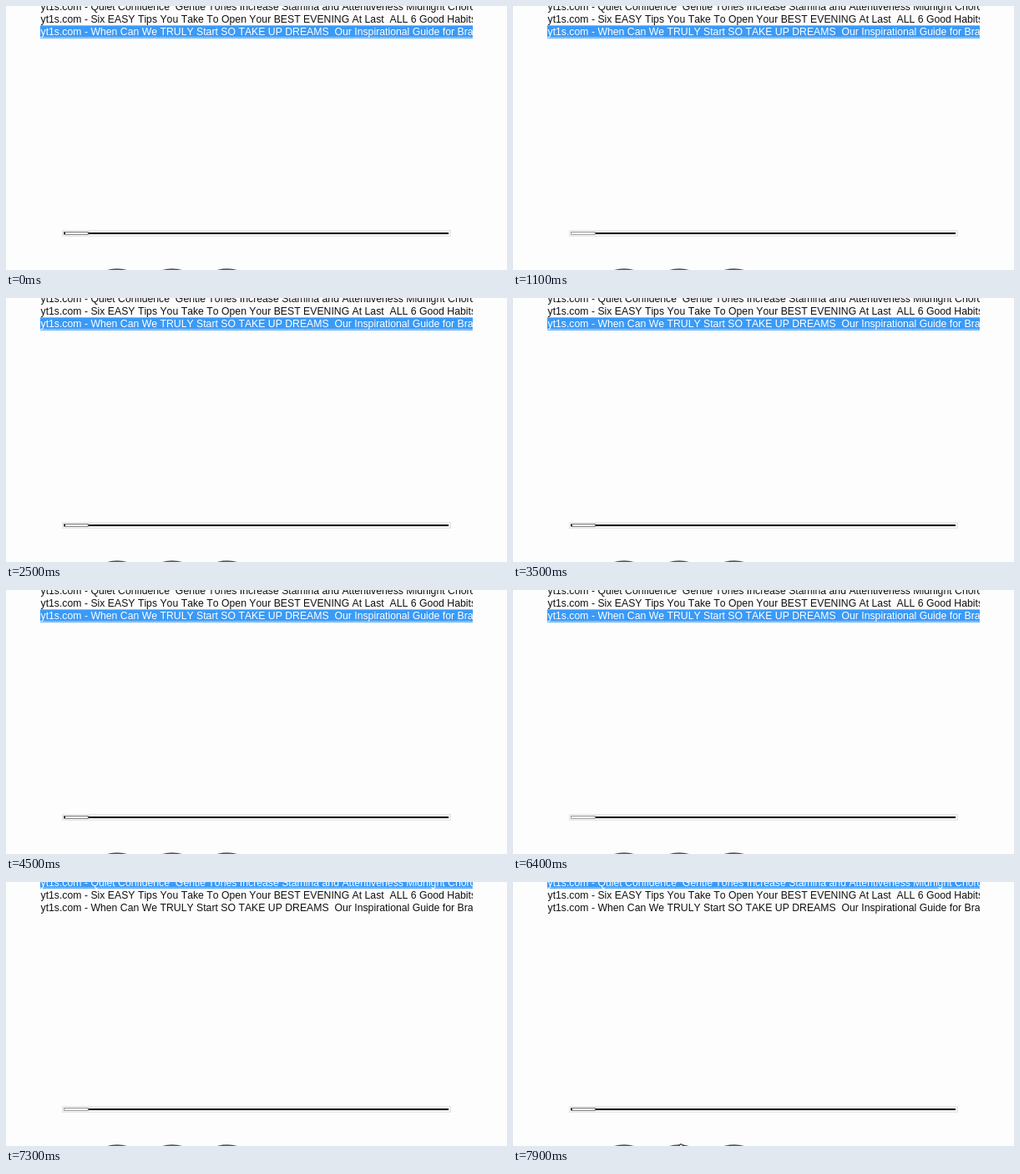
An HTML page for the animation above (8 s loop, 600x317 px).

```html
<!DOCTYPE html>
<html lang="en">
<head>
<meta charset="utf-8">
<title>Playlist</title>
<style>
  html, body { margin: 0; width: 100%; height: 100%; overflow: hidden; background: #fefdfe; }
  svg { display: block; width: 100%; height: 100%; }
  text { font: 12.25px "Liberation Sans", Arial, sans-serif; font-kerning: none; white-space: pre; }
</style>
</head>
<body>
<svg viewBox="0 0 600 317">
  <defs>
    <clipPath id="list"><rect x="41" y="0" width="518" height="60"/></clipPath>
  </defs>
  <rect width="600" height="317" fill="#fefdfe"/>
  <g id="rows" clip-path="url(#list)"></g>

  <rect x="67.5" y="269.5" width="465" height="7" fill="#f3f3f4" stroke="#e6e6e8"/>
  <rect x="70" y="271.9" width="460" height="2.1" fill="#1c1c20"/>
  <rect id="frame" x="69.7" y="271.5" width="28.6" height="2.8" fill="#fdfdfd" stroke-width="0.9"/>
  <rect id="focus" x="69.4" y="271.8" width="1.6" height="2.2" fill="#1c1c20"/>

  <g id="buttons" fill="#9c9c9c" stroke="#505052" stroke-width="1.4"></g>
  <path id="pointer" d="M197 318 L198.5 316.2 L200 316 L200.5 314.8 L202 314.8 L202.5 316 L204.5 316.4 L206 318 Z"
        fill="#fff" stroke="#111" stroke-width="1"/>
</svg>
<script>
const LOOP = 8000;
const PITCH = 15.4;
const PREFIX = "yt1s.com - ";
const titles = [
  "Quiet Confidence  Gentle Tones Increase Stamina and Attentiveness Midnight Chords",
  "Six EASY Tips You Take To Open Your BEST EVENING At Last  ALL 6 Good Habits",
  "When Can We TRULY Start SO TAKE UP DREAMS  Our Inspirational Guide for Brave Days"
];
const byId = id => document.getElementById(id);

function add(parent, tag, attrs) {
  const el = document.createElementNS("http://www.w3.org/2000/svg", tag);
  for (const key in attrs) el.setAttribute(key, attrs[key]);
  return parent.appendChild(el);
}

const rows = titles.map((title, i) => {
  const top = 23.4 - (2 - i) * PITCH;
  const mark = add(byId("rows"), "g", {});
  add(mark, "rect", { x: 41, y: top, width: 518, height: 15.4, fill: "#3a9af7" });
  add(mark, "path", {
    d: `M41 ${top + 14.2}h518`, stroke: "#d3e6f8", "stroke-dasharray": "1.4 0.8"
  });
  const label = add(byId("rows"), "text", { x: 41.5, y: top + 11.9 });
  label.textContent = PREFIX + title;
  return { mark, label };
});

for (const cx of [133, 199, 265]) {
  add(byId("buttons"), "circle", { cx, cy: 356, r: 40 });
}

function show(el, visible) {
  el.style.display = visible ? "" : "none";
}

function draw(t) {
  const selected = t < 6600 ? 2 : 0;
  rows.forEach(({ mark, label }, i) => {
    show(mark, i === selected);
    label.setAttribute("fill", i === selected ? "#fff" : "#111");
  });

  // The slider focus mark blinks once a second.
  const dim = (t + 900) % 1000 < 400;
  byId("frame").setAttribute("stroke", dim ? "#8e8e90" : "#6a6a6d");
  show(byId("focus"), !dim);

  show(byId("pointer"), t >= 7800);
}

const start = performance.now();
function tick(now) {
  draw(Math.max(0, now - start) % LOOP);
  requestAnimationFrame(tick);
}
draw(0);
requestAnimationFrame(tick);
</script>
</body>
</html>
```
